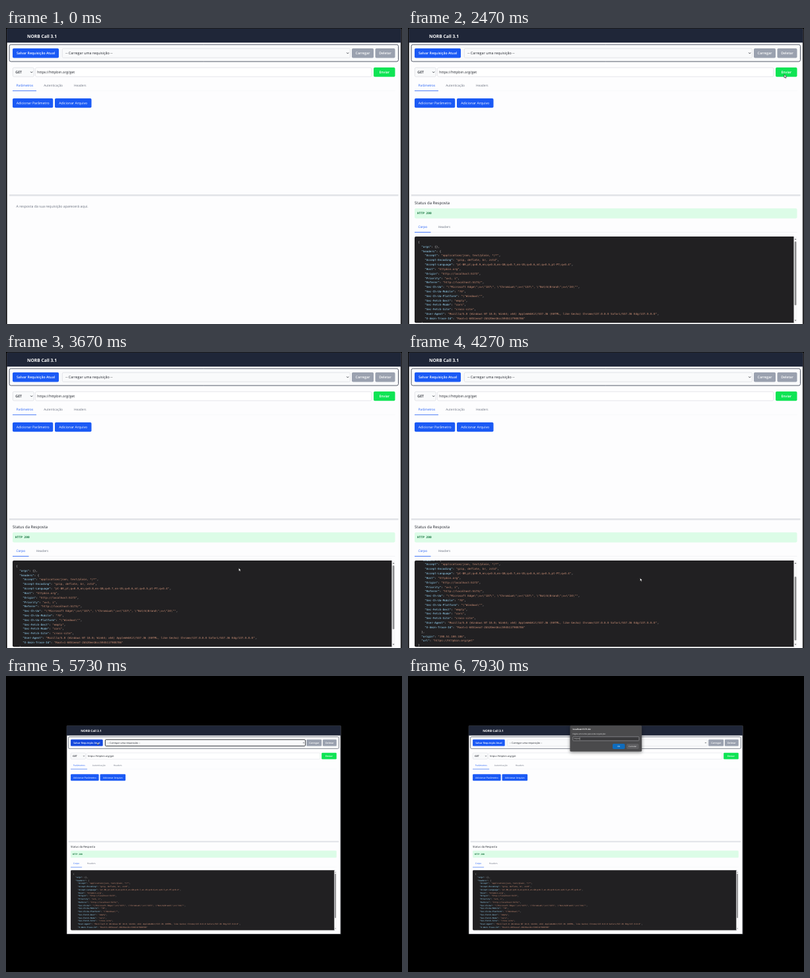
An HTML page with a canvas for the animation above (8 s loop, 600 by 450 pixels).

```html
<!DOCTYPE html>
<html lang="pt">
<head>
<meta charset="utf-8">
<title>REST client</title>
<style>
  html, body { margin: 0; width: 100%; height: 100%; overflow: hidden; background: #000; }
  canvas { display: block; width: 600px; height: 450px; }
</style>
</head>
<body>
<canvas id="stage" width="600" height="450"></canvas>
<script>
const ctx = document.getElementById('stage').getContext('2d');
ctx.textRendering = 'geometricPrecision';

const SANS = '"Open Sans", "Noto Sans", sans-serif';
const MONO = '"DejaVu Sans Mono", monospace';
const LOOP = 8000;
const SEND = 1800, REPLY = 2470, SHRINK = 5470, PROMPT = 6130;
const BLUE = '#1b5af5', GREY = '#9aa1af', INK = '#20242c', MUTED = '#6b7280', LINE = '#d3d6dc';

const BODY = String.raw`{
  "args": {},
  "headers": {
    "Accept": "application/json, text/plain, */*",
    "Accept-Encoding": "gzip, deflate, br, zstd",
    "Accept-Language": "pt-BR,pt;q=0.9,en;q=0.8,en-GB;q=0.7,en-US;q=0.6,mt;q=0.5,pt-PT;q=0.4",
    "Host": "httpbin.org",
    "Origin": "http://localhost:5173",
    "Priority": "u=1, i",
    "Referer": "http://localhost:5173/",
    "Sec-Ch-Ua": "\"Microsoft Edge\";v=\"137\", \"Chromium\";v=\"137\", \"Not/A)Brand\";v=\"24\"",
    "Sec-Ch-Ua-Mobile": "?0",
    "Sec-Ch-Ua-Platform": "\"Windows\"",
    "Sec-Fetch-Dest": "empty",
    "Sec-Fetch-Mode": "cors",
    "Sec-Fetch-Site": "cross-site",
    "User-Agent": "Mozilla/5.0 (Windows NT 10.0; Win64; x64) AppleWebKit/537.36 (KHTML, like Gecko) Chrome/137.0.0.0 Safari/537.36 Edg/137.0.0.0",
    "X-Amzn-Trace-Id": "Root=1-6851eea7-2b520ee16cc594511f908706"
  },
  "origin": "198.51.100.186",
  "url": "https://httpbin.org/get"
}`.split('\n');

// [time, x, y] of the pointer tip, in page units
const POINTER = [
  [450, 548, 12], [1050, 570, 70.5], [2500, 570, 70.5], [3200, 359.5, 226.5],
  [3400, 359.5, 226.5], [3750, 351.5, 343.5], [4430, 351.5, 343.5],
  [5000, 133, 171.5], [5380, 68, 37.5]
];
const SCROLL = [[3780, 0], [4000, 23], [4300, 23], [4480, 0]];

const ease = p => p * p * (3 - 2 * p);

function track(keys, t) {
  if (t <= keys[0][0]) return keys[0].slice(1);
  for (let i = 1; i < keys.length; i++) {
    const [from, ...a] = keys[i - 1], [to, ...b] = keys[i];
    if (t <= to) {
      const p = ease((t - from) / (to - from));
      return a.map((v, k) => v + (b[k] - v) * p);
    }
  }
  return keys[keys.length - 1].slice(1);
}

function box(x0, y0, x1, y1, fill, radius = 0, stroke, weight = 0.6) {
  ctx.beginPath();
  ctx.roundRect(x0, y0, x1 - x0, y1 - y0, radius);
  if (fill) { ctx.fillStyle = fill; ctx.fill(); }
  if (stroke) { ctx.strokeStyle = stroke; ctx.lineWidth = weight; ctx.stroke(); }
}

// y is the middle of the capital letters
function text(str, x, y, size, color = INK, { weight = 400, align = 'left', family = SANS } = {}) {
  ctx.font = `${weight} ${size}px ${family}`;
  ctx.textAlign = align;
  ctx.fillStyle = color;
  ctx.fillText(str, x, y + size * 0.34);
}

function button(label, x0, y0, x1, y1, fill, weight = 400, size = 5.2) {
  box(x0, y0, x1, y1, fill, 1.8);
  text(label, (x0 + x1) / 2, (y0 + y1) / 2, size, '#fff', { weight, align: 'center' });
}

function chevron(x, y) {
  ctx.beginPath();
  ctx.moveTo(x - 1.5, y - 0.8);
  ctx.lineTo(x, y + 0.8);
  ctx.lineTo(x + 1.5, y - 0.8);
  ctx.strokeStyle = INK;
  ctx.lineWidth = 0.8;
  ctx.stroke();
}

function tabs(y, items, underlineEnd) {
  items.forEach(([label, x], i) => text(label, x, y, 4.75, i ? MUTED : BLUE));
  box(10, y + 8.1, 589.5, y + 8.4, '#e8eaee');
  box(10, y + 7.7, underlineEnd, y + 8.5, BLUE);
}

function drawRequest(t) {
  const sending = t >= SEND && t < REPLY;
  const focused = t >= SHRINK && t < PROMPT;
  const hover = t >= 5330 && t < PROMPT;

  box(5, 25.2, 594.5, 51, '#f9fafb', 2.5, '#414858', 0.9);
  button('Salvar Requisição Atual', 10, 31, 80, 45.5, hover ? '#1549dd' : BLUE, 600);
  box(85.3, 31.3, 521.5, 45.2, '#f9fafb', 1.8, focused ? '#20242c' : LINE, focused ? 1.3 : 0.6);
  text('-- Carregar uma requisição --', 90, 38.3, 5.4);
  chevron(517.7, 38.2);
  button('Carregar', 524, 31, 557, 45.5, GREY, 600);
  button('Deletar', 559.5, 31, 589.5, 45.5, GREY, 600);

  box(10.3, 60.3, 42.3, 74, '#f9fafb', 1.8, LINE);
  text('GET', 14.3, 67.3, 5.3, INK, { weight: 600 });
  chevron(38.7, 67.2);
  box(44.7, 60.3, sending ? 541 : 553.8, 74, '#fff', 1.8, LINE);
  text('https://httpbin.org/get', 47.3, 67.3, 5.45);
  if (sending) button('Enviando...', 544, 60, 589.5, 74.2, GREY, 600);
  else button('Enviar', 557, 60, 589.5, 74.2, '#0fe454', 600);

  tabs(87.6, [['Parâmetros', 15.5], ['Autenticação', 57.2], ['Headers', 103]], 46);
  button('Adicionar Parâmetro', 10, 107, 71.3, 121.3, BLUE);
  button('Adicionar Arquivo', 74, 107, 129.5, 121.3, BLUE);
  box(5, 252.9, 594.5, 255.6, '#e1e3e7');
}

function drawCode(scroll) {
  box(10, 317, 587, 448.2, '#212022', 2);
  ctx.save();
  ctx.beginPath();
  ctx.rect(10, 317, 574.5, 131.2);
  ctx.clip();
  BODY.forEach((line, i) => {
    const y = 325.6 + i * 6.82 - scroll;
    const pieces = line.match(/"(?:\\.|[^"\\])*"(?:(?=:))?|[^"]+/g);
    let column = 0;
    pieces.forEach((piece, k) => {
      const isKey = piece[0] === '"' && (pieces[k + 1] || '')[0] === ':';
      const color = isKey ? '#9cdcfe' : piece[0] === '"' ? '#ce9178' : '#d4d4d4';
      text(piece, 15.3 + column * 2.5, y, 4.153, color, { family: MONO });
      column += piece.length;
    });
  });
  ctx.restore();

  box(584.5, 317, 589.5, 448.2, '#f7f7f8');
  const top = 324.5 + scroll * 0.74;
  box(585.8, top, 588.4, top + 97, '#8b8b8d', 1.3);
  for (const [y, dir] of [[321, -1], [444.8, 1]]) {
    ctx.beginPath();
    ctx.moveTo(585.7, y - dir);
    ctx.lineTo(588.5, y - dir);
    ctx.lineTo(587.1, y + dir);
    ctx.fillStyle = '#77777a';
    ctx.fill();
  }
}

function drawResponse(t) {
  if (t < REPLY) {
    const note = t < SEND ? 'A resposta da sua requisição aparecerá aqui.' : 'Carregando...';
    text(note, 15.5, 271.2, 5.25, MUTED);
    return;
  }
  text('Status da Resposta', 10, 266.3, 6, INK);
  box(10, 274.2, 589.5, 289.4, '#dcfce7', 1.8);
  text('HTTP 200', 14, 281.7, 4.5, '#12733c', { weight: 700, family: MONO });
  tabs(302.5, [['Corpo', 15.5], ['Headers', 45.7]], 34.5);
  drawCode(track(SCROLL, t)[0]);
}

function drawPointer(t) {
  if (t < 450 || t >= PROMPT) return;
  const [x, y] = track(POINTER, t);
  ctx.save();
  ctx.translate(x, y);
  ctx.beginPath();
  [[0, 0], [0, 5.1], [1.2, 4], [2, 5.8], [2.9, 5.4], [2.1, 3.7], [3.6, 3.6]]
    .forEach(([px, py]) => ctx.lineTo(px, py));
  ctx.closePath();
  ctx.fillStyle = '#fff';
  ctx.strokeStyle = '#1a1a1a';
  ctx.lineWidth = 0.6;
  ctx.fill();
  ctx.stroke();
  ctx.restore();
}

function drawPrompt(t) {
  ctx.save();
  ctx.shadowColor = 'rgba(0,0,0,.45)';
  ctx.shadowBlur = 5;
  ctx.shadowOffsetY = 1.5;
  box(245.5, 75.3, 354.2, 114.8, '#4a4a4c', 1.5);
  ctx.restore();
  text('localhost:5173 diz', 249.6, 81.3, 3.1, '#fff', { weight: 700 });
  text('Digite um nome para esta requisição:', 249.6, 88, 2.9, '#f0f0f0');
  box(249.8, 92.3, 350, 98.4, '#3a3a3c', 1, '#a5a5a8', 0.6);

  const typed = 'reque'.slice(0, Math.max(0, Math.floor((t - 7150) / 150)));
  text(typed, 251.4, 95.3, 3, '#f4f4f4');
  const caret = 251.7 + ctx.measureText(typed).width;
  box(caret, 93.5, caret + 0.4, 97.3, '#fff');

  button('OK', 310, 103, 328.6, 111, '#0f6cbd', 400, 3);
  button('Cancelar', 331, 103, 349.8, 111, '#5d5d60', 400, 3);
}

function draw(t) {
  ctx.setTransform(1, 0, 0, 1, 0, 0);
  ctx.fillStyle = '#000';
  ctx.fillRect(0, 0, 600, 450);

  const small = t >= SHRINK;
  if (small) ctx.setTransform(0.695, 0, 0, 0.695, 91.1, 75);
  box(0.8, 0.4, 599.6, 457.6, '#37383c', 2);
  box(1.5, 1, 598.2, 24, '#1f2638', 1.5);
  box(1.8, 22.3, 597.8, 456.2, '#fdfdfe');
  text('NORB Call 3.1', 32, 12.3, 6.7, '#fff', { weight: 700 });
  drawRequest(t);
  drawResponse(t);
  drawPointer(t);

  ctx.setTransform(1, 0, 0, 1, 0, 0);
  if (t >= PROMPT) drawPrompt(t);
}

const start = performance.now();
function tick() {
  draw((performance.now() - start) % LOOP);
  requestAnimationFrame(tick);
}
tick();
</script>
</body>
</html>
```
